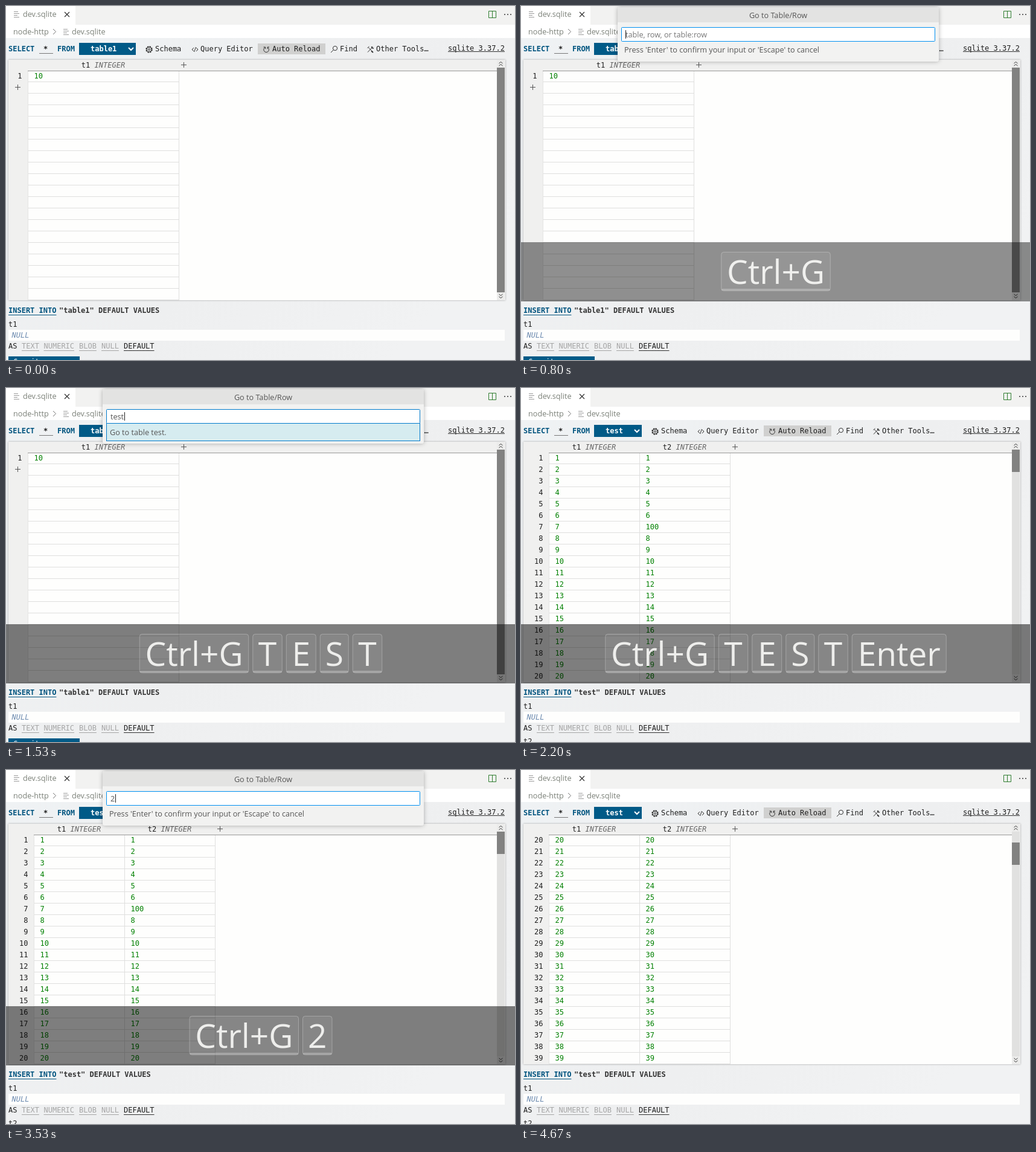
These frames come from a looping animation (843 by 586 pixels, 4.94 s). An HTML page:

```html
<!DOCTYPE html>
<html lang="en">
<head>
<meta charset="utf-8">
<title>Go to table or row</title>
<style>
  html, body { margin: 0; width: 100%; height: 100%; overflow: hidden; background: #fff; }
  svg { display: block; width: 843px; height: 586px; }
  text { font: 12px "DejaVu Sans Mono", monospace; fill: #1f1f1f; white-space: pre; }
  .bold { font-weight: bold; }
  .blue { fill: #00547f; }
  .white { fill: #fff; }
  .dark { fill: #333; }
  .green { fill: #008000; }
  .grey { fill: #a6a6a6; }
  .null { fill: #6d8bb0; font-style: italic; }
  .type { fill: #666; font-style: italic; }
  .end { text-anchor: end; }
  .mid { text-anchor: middle; }
  .ui { font: 12.65px "Open Sans", "Noto Sans", sans-serif; fill: #555; }
  .tab { fill: #7b8078; }
  .hint { fill: #777; }
  .cap { font: 55px "Open Sans", "Noto Sans", sans-serif; fill: #eeeeec; text-anchor: middle; }
  .line { fill: none; stroke: #333; stroke-width: 1; }
</style>
</head>
<body>
<svg id="stage" viewBox="0 0 843 586">
  <defs>
    <linearGradient id="page" x2="1" y2=".6">
      <stop offset="0" stop-color="#eff2f4"/>
      <stop offset=".6" stop-color="#eeeff0"/>
      <stop offset="1" stop-color="#f1f2f3"/>
    </linearGradient>
    <filter id="glow" x="-10%" y="-20%" width="120%" height="140%">
      <feDropShadow dx="0" dy="0" stdDeviation="3.5" flood-opacity=".3"/>
    </filter>
    <filter id="edge" x="-2%" y="-2%" width="104%" height="104%">
      <feDropShadow dx="0" dy="0" stdDeviation="1.6" flood-opacity=".35"/>
    </filter>
  </defs>
  <g id="chrome"></g>
  <g id="view"></g>
</svg>
<script>
const LOOP = 4940;
const BRAND = '#005a87';
const CAP_WIDTH = { 'Ctrl': 112, 'Ctrl+G': 181.5, T: 49.5, E: 50, S: 48, Enter: 157, 2: 49.5, 0: 50 };

// Each entry changes part of the state from the given time on.
const timeline = [
  [0, { table: 'table1', first: 1, keys: '', fade: 0, open: false, input: '', info: '' }],
  [670, { keys: 'Ctrl', fade: .25 }],
  [730, { fade: .6 }],
  [800, { keys: 'Ctrl+G', fade: .87, open: true }],
  [870, { fade: 1 }],
  [1200, { keys: 'Ctrl+G T E', input: 'te' }],
  [1330, { keys: 'Ctrl+G T E S', input: 'tes' }],
  [1470, { keys: 'Ctrl+G T E S T', input: 'test' }],
  [1530, { info: 'Go to table test.' }],
  [2070, { keys: 'Ctrl+G T E S T Enter' }],
  [2130, { open: false }],
  [2200, { table: 'test', input: '', info: '' }],
  [2730, { keys: 'Ctrl' }],
  [2930, { keys: 'Ctrl+G' }],
  [3000, { open: true }],
  [3530, { keys: 'Ctrl+G 2', input: '2' }],
  [3600, { info: 'Go to row 2.' }],
  [3730, { keys: 'Ctrl+G 2 0', input: '20', info: 'Go to row 20.' }],
  [3870, { keys: 'Ctrl+G 2 0 Enter', open: false }],
  [3930, { first: 20, input: '', info: '' }],
  [4670, { keys: '', fade: 0 }],
];

const text = (x, y, s, cls = '') => `<text x="${x}" y="${y}" class="${cls}">${s}</text>`;
const rect = (x, y, w, h, fill, more = '') =>
  `<rect x="${x}" y="${y}" width="${w}" height="${h}" fill="${fill}" ${more}/>`;
const path = (d, more = '') => `<path d="${d}" class="line" ${more}/>`;
const plus = (x, y) => path(`M${x - 4.5} ${y}h9M${x} ${y - 4.5}v9`, 'style="stroke:#555"');
const underlined = (x, y, s, cls, color) =>
  text(x, y, s, cls) + rect(x, y + 3, s.length * 7.22, 1, color);
const fileIcon = (x, y) =>
  path(`M${x} ${y}h7M${x} ${y + 3}h9M${x} ${y + 6}h6M${x} ${y + 9}h9`, 'style="stroke:#999"');

function chrome() {
  return rect(0, 0, 843, 53, '#fff') +
    rect(115, 0, 728, 31, '#f2f2f1') +
    fileIcon(13, 9.5) + text(28, 18, 'dev.sqlite', 'ui tab') +
    path('M97 10l8 8M105 10l-8 8', 'style="stroke-width:1.2"') +
    path('M799.5 8.5h12v11h-12zM805.5 8.5v11', 'style="stroke:#2f7d2f"') +
    [826, 831, 836].map(x => `<circle cx="${x}" cy="14" r="1.1" fill="#444"/>`).join('') +
    text(12, 47, 'node-http', 'ui tab') +
    path('M78 38l4.5 4.5l-4.5 4.5', 'style="stroke:#777"') +
    fileIcon(95, 38.5) + text(109, 47, 'dev.sqlite', 'ui tab') +
    rect(0, 53, 843, 533, 'url(#page)');
}

function toolbar({ table }) {
  const shift = table === 'test' ? -15 : 0;
  return text(4, 75, 'SELECT', 'bold blue') + text(62, 75, '*', 'bold') +
    rect(55, 78, 23, 1, '#777') + text(85, 75, 'FROM', 'bold blue') +
    rect(121, 61, 94 + shift, 20, BRAND) + text(140, 75, table, 'bold white') +
    `<g transform="translate(${shift})">` +
      path('M203 69l4 4l4-4', 'style="stroke:#fff;stroke-width:2"') +
      '<circle cx="237" cy="72" r="4.8" class="line" style="stroke-width:1.8;stroke-dasharray:2.4 1.37"/>' +
      '<circle cx="237" cy="72" r="3.9" class="line"/><circle cx="237" cy="72" r="1.5" class="line"/>' +
      text(247, 75, 'Schema') +
      path('M311 69l-3 3l3 3M315 69l3 3l-3 3M314.300 68l-2.500 8') +
      text(322, 75, 'Query Editor') +
      rect(417, 62, 112, 18, '#d0d0cf') +
      path('M429 68.500a4.300 4.300 0 1 0 4.500 .200M426.500 68h3v3M433 71v-3h3') +
      text(441, 75, 'Auto Reload') +
      '<circle cx="545" cy="70" r="3.600" class="line"/>' + path('M542.500 72.600l-4.500 4.400') +
      text(553, 75, 'Find') +
      path('M600 68.500l7.500 7.500M607.500 67.500l-8.500 9M598.500 69.500l3-2.500') +
      path('M605 74.500l3 2.500M605.500 67l1 2.500l2.500 .5', 'style="stroke-width:1.7"') +
      text(613, 75, 'Other Tools…') +
    '</g>' +
    text(732, 74, 'sqlite 3.37.2') + rect(732, 75, 94, 1, '#333');
}

function grid({ table, first }) {
  const small = table === 'table1';
  const left = small ? 36 : 46;
  const width = small ? 250 : 150;
  const columns = small ? ['t1'] : ['t1', 't2'];
  const right = left + width * columns.length;
  let out = rect(4, 89, 823, 398, '#f0f0ef', 'filter="url(#edge)"') +
    rect(left, 108, 813 - left, 379, '#fefefd') +
    rect(left, 107, 813 - left, 1, '#999');

  for (let i = 0; i < 20; i++) {
    const y = 120 + 19 * i, id = first + i;
    out += rect(left, y + 5, right - left, 1, '#dfdfde');
    if (small && i) continue;
    out += text(left - 9.5, y, id, 'end');
    columns.forEach((name, c) => {
      const value = small ? 10 : name === 't2' && id === 7 ? 100 : id;
      out += text(left + 10.5 + c * width, y, value, 'green');
    });
  }
  columns.forEach((name, c) => {
    const x = left + c * width;
    out += text(x + width / 2, 102, `${name} <tspan class="type">INTEGER</tspan>`, 'mid') +
      rect(x + width, 108, 1, 379, '#dfdfde');
  });
  out += rect(left, 108, 1, 379, '#e4e4e3') + plus(right + 8.5, 97.5);
  if (small) out += plus(19.5, 134.5);

  const thumbY = first === 1 ? 102 : 120;
  return out + rect(813, 89, 13, 398, '#ececeb') + rect(813, 102, 13, 372, '#e1e1e0') +
    rect(813, thumbY, 13, small ? 372 : 37, '#828281') +
    path('M816.500 95l3-2.500l3 2.500M816.500 99l3-2.500l3 2.500M816.500 477l3 2.500l3-2.500M816.500 481l3 2.500l3-2.500');
}

function form({ table }) {
  const types = [['TEXT', 26], ['NUMERIC', 62.5], ['BLOB', 121], ['NULL', 158]];
  return underlined(4, 508, 'INSERT INTO', 'bold blue', '#00547f') +
    text(88, 508, `"${table}" DEFAULT VALUES`, 'bold dark') +
    text(4, 531, 't1') + rect(4, 536, 822, 18, '#fefefd') + text(9.5, 549, 'NULL', 'null') +
    text(4, 567, 'AS') +
    types.map(([s, x]) => underlined(x, 567, s, 'grey', '#a6a6a6')).join('') +
    underlined(195, 567, 'DEFAULT', '', '#333') +
    (table === 'test' ? text(4, 589, 't2')
      : rect(4, 580, 118, 6, BRAND) + text(12, 593, 'Commit', 'white'));
}

function palette({ open, input, info }) {
  if (!open) return '';
  const border = info ? '#007acc' : '#0090f1';
  return rect(160, 2, 532, 90, '#f2f2f1', 'rx="4" filter="url(#glow)"') +
    '<path d="M160 27V6a4 4 0 0 1 4-4h524a4 4 0 0 1 4 4v21z" fill="#e3e3e2"/>' +
    text(426, 20, 'Go to Table/Row', 'ui mid') +
    rect(166.5, 35.5, 519, 23, '#fff', `stroke="${border}" rx="1"`) +
    (info
      ? rect(166.5, 58.5, 519, 29, '#d6ecf0', `stroke="${border}"`) + text(172, 78, info, 'ui')
      : text(171, 77, "Press 'Enter' to confirm your input or 'Escape' to cancel", 'ui')) +
    (input ? `<text id="typed" x="173" y="52" class="ui">${input}</text>`
      : text(173, 52, 'table, row, or table:row', 'ui hint')) +
    '<rect id="caret" x="173" y="40" width="1" height="14" fill="#222"/>';
}

function keyCaps({ keys, fade }) {
  if (!fade) return '';
  const labels = keys.split(' ');
  const total = labels.reduce((sum, k) => sum + CAP_WIDTH[k] + 6, -6);
  let x = 422 - total / 2;
  let out = rect(0, 391, 843, 98, '#000', 'opacity=".5"');
  for (const label of labels) {
    const w = CAP_WIDTH[label];
    out += rect(x + .5, 407.5, w - 1, 64, '#fff', 'rx="4" fill-opacity=".06" stroke="#fff" stroke-opacity=".28"') +
      rect(x + 1, 468, w - 2, 3, '#fff', 'rx="1.5" opacity=".25"') +
      text(x + w / 2, 460, label, 'cap');
    x += w + 6;
  }
  return `<g opacity="${fade}">${out}</g>`;
}

const view = document.getElementById('view');
document.getElementById('chrome').innerHTML = chrome();

let shown = -1;
function tick() {
  const time = performance.now() % LOOP;
  const step = timeline.filter(([at]) => at <= time).length;
  if (step !== shown) {
    shown = step;
    const state = Object.assign({}, ...timeline.slice(0, step).map(([, change]) => change));
    view.innerHTML = [toolbar, grid, form, palette, keyCaps].map(draw => draw(state)).join('');
    const typed = document.getElementById('typed');
    if (typed) {
      document.getElementById('caret').setAttribute('x', Math.round(173.5 + typed.getComputedTextLength()));
    }
  }
  requestAnimationFrame(tick);
}
tick();
</script>
</body>
</html>
```
